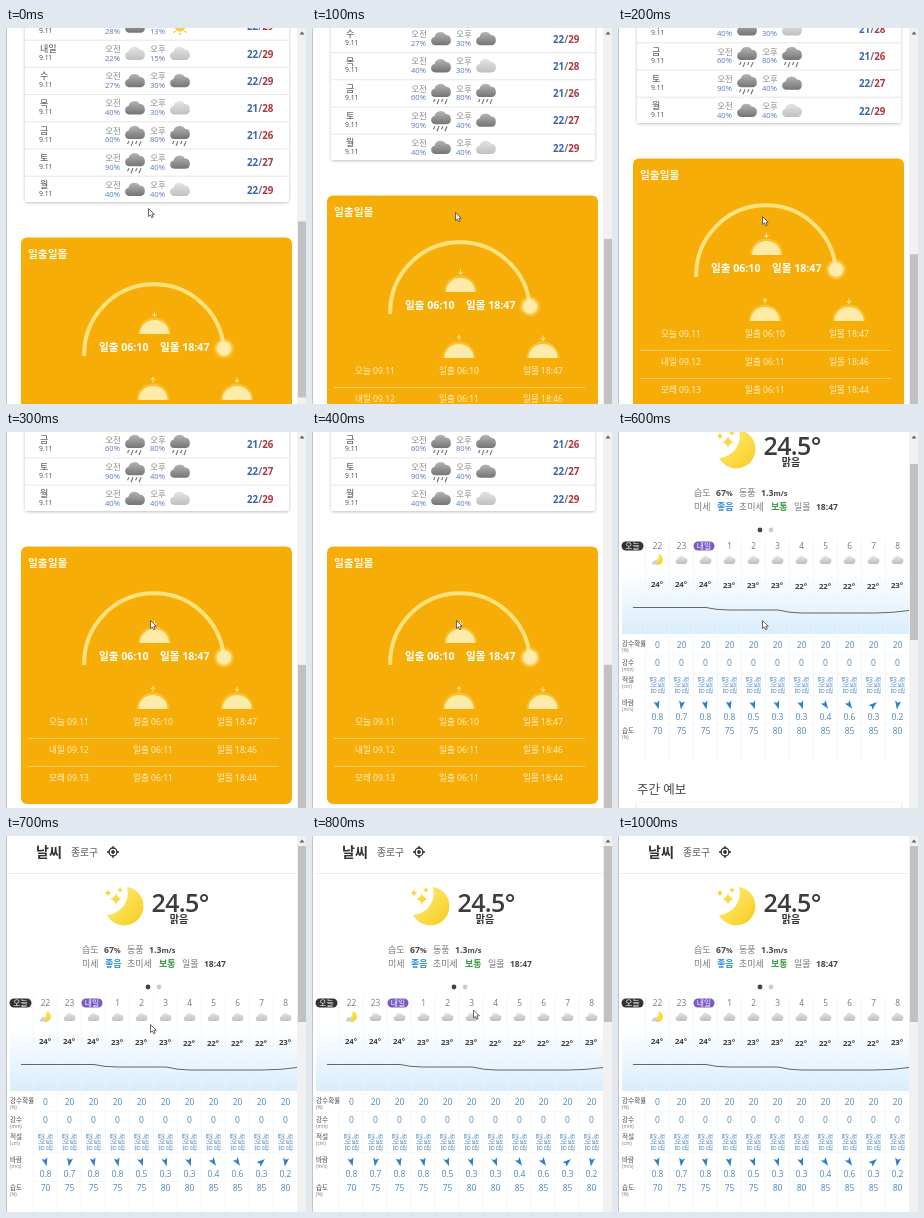
An HTML page that plays this animation: 300x376 px, repeating every 1200 ms.

```html
<!DOCTYPE html>
<html lang="ko">
<head>
<meta charset="utf-8">
<style>
html, body { margin: 0; width: 100%; height: 100%; overflow: hidden; background: #fff; }
svg { display: block; width: 300px; height: 376px; }
text { font-family: "Open Sans", "Noto Sans CJK KR", "Noto Sans CJK", sans-serif; }
</style>
</head>
<body>
<svg id="stage" viewBox="0 0 300 376">
  <defs>
    <linearGradient id="dark" x2="0" y2="1"><stop stop-color="#b4b4b4"/><stop offset="1" stop-color="#747474"/></linearGradient>
    <linearGradient id="light" x2="0" y2="1"><stop stop-color="#e4e4e4"/><stop offset="1" stop-color="#c0c0c0"/></linearGradient>
    <linearGradient id="sky" x2="0" y2="1"><stop stop-color="#fff"/><stop offset="1" stop-color="#d9edfc"/></linearGradient>
    <linearGradient id="gold" x2="1" y2="1"><stop stop-color="#fff07c"/><stop offset="1" stop-color="#f7cb1e"/></linearGradient>
    <radialGradient id="glow"><stop offset=".45" stop-color="#fff0a8"/><stop offset="1" stop-color="#ffdf70" stop-opacity="0"/></radialGradient>
    <filter id="shadow" x="-10%" y="-10%" width="120%" height="120%"><feDropShadow dx="0" dy="1" stdDeviation="1.5" flood-opacity=".25"/></filter>
    <filter id="soft" x="-20%" y="-20%" width="140%" height="140%"><feGaussianBlur stdDeviation=".5"/></filter>
    <path id="cloud" d="M-6 6.5A4.2 4.2 0 0 1-6.5-1.8A6.3 6.3 0 0 1 5-3.8A4.8 5.2 0 0 1 6 6.5Z"/>
    <path id="moon" d="M121 51A19.3 19.3 0 1 1 101 79A22 22 0 0 0 121 51Z" fill="url(#gold)"/>
    <path id="star" d="M0-5Q.8-.8 5 0Q.8.8 0 5Q-.8.8-5 0Q-.8-.8 0-5Z" fill="#f9d83a"/>
  </defs>
  <g id="page"></g>
  <rect width="1" height="376" fill="#c4c4c4"/>
  <rect x="291" width="9" height="376" fill="#f1f1f1"/>
  <path d="M293.5 6.5L296 3.5L298.5 6.5Z" fill="#606060"/>
  <rect id="thumb" x="292" width="8" height="176" fill="#c1c1c1"/>
  <path id="cursor" d="M0 0V8L1.9 6.4L3.2 9.2L4.6 8.6L3.4 5.8H5.8Z" fill="#fff" stroke="#444" stroke-width=".8"/>
</svg>
<script>
const $ = id => document.getElementById(id);
const INK = '#484848', GRAY = '#777', BLUE = '#4d86bf';

// Text placed by its vertical middle.
const text = (x, y, str, size, fill = INK, weight = 400, anchor = 'start', extra = '') =>
  `<text x="${x}" y="${y + size * 0.36}" font-size="${size}" fill="${fill}" font-weight="${weight}" text-anchor="${anchor}" ${extra}>${str}</text>`;
const mid = (x, y, str, size, fill, weight, extra) => text(x, y, str, size, fill, weight, 'middle', extra);
const small = unit => `<tspan font-size="7.4">${unit}</tspan>`;
const line = (x1, y1, x2, y2, stroke, width = 1) =>
  `<path d="M${x1} ${y1}L${x2} ${y2}" stroke="${stroke}" stroke-width="${width}" fill="none"/>`;
const use = (id, x, y, scale = 1, fill = '') =>
  `<use href="#${id}" transform="translate(${x} ${y}) scale(${scale})" fill="${fill}"/>`;

function header() {
  return text(30, 16, '날씨', 14, '#333', 700) + text(65, 16, '종로구', 9.8, '#555') +
    `<g stroke="#333" fill="none" stroke-width="1.3"><circle cx="107" cy="16" r="4"/><path d="M107 10v3m0 6v3M101 16h3m6 0h3"/></g><circle cx="107" cy="16" r="1.9" fill="#333"/>` +
    line(2, 37.5, 291, 37.5, '#eee') +
    '<use href="#moon"/>' + use('star', 110, 63, 1.2) + use('star', 102, 57, .7) + use('star', 114, 54, .6) +
    text(145.5, 67, '24.5°', 25, '#3c3c3c', 600, 'start', 'letter-spacing="-.6"') +
    mid(173, 83, '맑음', 10, '#333', 700) +
    text(76, 114, '습도', 9, GRAY) + text(98, 114, '67' + small('%'), 8.7, INK, 700) +
    text(121, 114, '동풍', 9, GRAY) + text(143, 114, '1.3' + small('m/s'), 8.7, INK, 700) +
    text(76, 128, '미세', 9, GRAY) + text(99, 128, '좋음', 9, '#2f8fdc', 700) +
    text(121, 128, '초미세', 9, GRAY) + text(153, 128, '보통', 9, '#3a9a3f', 700) +
    text(176, 128, '일몰', 9, GRAY) + text(198, 128, '18:47', 8.5, INK, 700) +
    '<circle cx="142" cy="151" r="2.4" fill="#444"/><circle cx="153" cy="151" r="2.4" fill="#ccc"/>';
}

const pill = (x, y, width, label, fill) =>
  `<rect x="${x - width / 2}" y="${y - 4.5}" width="${width}" height="9" rx="4.5" fill="${fill}"/>` + mid(x, y, label, 7.8, '#fff');

function hourly() {
  const hours = [22, 23, '내일', 1, 2, 3, 4, 5, 6, 7, 8];
  const temps = [24, 24, 24, 23, 23, 23, 22, 22, 22, 22, 23];
  const winds = [.8, .7, .8, .8, .5, .3, .3, .4, .6, .3, .2];
  const angles = [-15, 8, -12, -12, -20, -18, -20, -35, -35, -130, 8];
  const humidity = [70, 75, 75, 75, 75, 80, 80, 85, 85, 85, 80];
  const labels = [['강수확률', '(%)', 265], ['강수', '(mm)', 284], ['적설', '(cm)', 301], ['바람', '(m/s)', 324], ['습도', '(%)', 352]];

  let out = '<rect x="4" y="192" width="287" height="63" fill="url(#sky)"/>' + pill(14.5, 167, 22, '오늘', '#333');
  for (const [name, unit, y] of labels) out += text(4, y, name, 6.6, INK) + text(4, y + 6.5, unit, 4.8, GRAY);
  for (const y of [257.5, 275.5, 294.5, 316.5, 345.5]) out += line(28, y, 291, y, '#f5f6f8', .7);

  hours.forEach((hour, i) => {
    const x = 39.5 + 24 * i;
    out += line(x - 12, 160, x - 12, 381, '#f1f3f6', .7);
    out += i === 2 ? pill(x - 1.5, 167, 21, hour, '#7a5bc4') : mid(x, 167, hour, 8.3, GRAY);
    out += i ? use('cloud', x, 181, .6, 'url(#light)')
      : `<use href="#moon" transform="translate(${x} 180.5) scale(.28) translate(-118 -70)"/>` + use('cloud', x - 2.5, 183.5, .32, '#d0d0d0');
    out += mid(x - .5, 205 + (24 - temps[i]) * 1.1, temps[i] + '°', 7.8, '#3a3a3a', 700);
    out += mid(x, 266, i ? 20 : 0, 8.5, BLUE) + mid(x, 284, 0, 8.5, BLUE);
    out += `<g transform="translate(${x - .5} 306) rotate(90)">${mid(0, -4, '적설량', 6.4, BLUE)}${mid(0, 4, '없어요', 6.4, BLUE)}</g>`;
    out += `<path d="M0 4.5L-3-4L0-2.2L3-4Z" fill="#2c82d2" transform="translate(${x} 326) rotate(${angles[i]})"/>`;
    out += mid(x, 338, winds[i].toFixed(1), 8.5, BLUE) + mid(x, 352, humidity[i], 8.5, BLUE);
  });
  return out + '<path d="M15 228.5H88Q98 231 112 231H160Q172 234 184 234H256Q274 234 291 231.5" fill="none" stroke="#666"/>';
}

function skyIcon(kind, x, y) {
  if (kind === 'sun') {
    let rays = '';
    for (let a = 0; a < 360; a += 45) rays += `<path d="M0-6.5V-9" transform="rotate(${a})"/>`;
    return `<g transform="translate(${x} ${y})" stroke="#f8c832" stroke-width="1.5"><circle r="4.5" fill="#ffd23c"/>${rays}</g>`;
  }
  if (kind !== 'rain') return use('cloud', x, y, 1, `url(#${kind})`);
  return use('cloud', x, y - 2.5, 1, 'url(#dark)') +
    `<path d="M${x - 6} ${y + 6}l-1.5 3m5.5-3l-2 5m6-5l-1.5 3m5.5-3l-2 5" stroke="#777" stroke-width="1.2" fill="none"/>`;
}

function weekly() {
  const days = [
    ['오늘', 28, 'dark', 13, 'sun', 22, 29],
    ['내일', 22, 'light', 15, 'light', 22, 29],
    ['수', 27, 'dark', 30, 'dark', 22, 29],
    ['목', 40, 'dark', 30, 'light', 21, 28],
    ['금', 60, 'rain', 80, 'rain', 21, 26],
    ['토', 90, 'rain', 40, 'dark', 22, 27],
    ['월', 40, 'dark', 40, 'light', 22, 29]
  ];
  let out = text(19, 410, '주간 예보', 12.5, INK) +
    '<rect x="19" y="424" width="264" height="192" rx="3" fill="#fff" filter="url(#shadow)"/>';
  days.forEach(([day, am, amSky, pm, pmSky, low, high], i) => {
    const y = 435.8 + 27.2 * i;
    if (i) out += line(19, y - 8.8, 283, y - 8.8, '#e4e4e4', .9);
    out += text(34, y, day, 9, INK) + text(33, y + 8.5, '9.11', 6.8, INK);
    for (const [x, label, chance, sky] of [[107, '오전', am, amSky], [152, '오후', pm, pmSky]])
      out += mid(x, y, label, 8.5, '#8a8a8a') + mid(x - .5, y + 9, chance + '%', 7.6, '#5577bd') + skyIcon(sky, x + 22, y + 4.5);
    out += text(241, y + 5, `<tspan fill="#3866b4">${low}</tspan><tspan fill="#777">/</tspan><tspan fill="#ae373d">${high}</tspan>`, 9.8, INK, 700);
  });
  return out;
}

function halfSun(x, y, up) {
  const head = up ? 'M-2-20L0-22.5L2-20' : 'M-2-20L0-17.5L2-20';
  return `<g transform="translate(${x} ${y})"><path d="M-16.5 0A16.5 16.5 0 0 1 16.5 0Z" fill="#ffdd70" opacity=".4" filter="url(#soft)"/>
    <path d="M-14.5 0A14.5 14 0 0 1 14.5 0Z" fill="#ffeba8" filter="url(#soft)"/>
    <path d="M0-17.5V-22.5${head}" stroke="#ffe9a0" fill="none"/></g>`;
}

function sunCard() {
  const cream = '#fff3d0';
  const rows = [['오늘 09.11', '06:10', '18:47'], ['내일 09.12', '06:11', '18:46'], ['모레 09.13', '06:11', '18:44']];
  let out = '<rect x="15" y="-.5" width="271" height="257.5" rx="6" fill="#f7ad08"/>' +
    text(22, 16, '일출일몰', 10.7, '#fff8e4', 700) +
    '<path d="M78.2 118V117A69.95 69.95 0 0 1 217.9 111" fill="none" stroke="#ffe27c" stroke-width="4"/>' +
    '<circle cx="218" cy="110.5" r="11" fill="url(#glow)"/><circle cx="218" cy="110.5" r="7" fill="#ffebab" filter="url(#soft)"/>' +
    halfSun(148.5, 96, false) + halfSun(147, 162, true) + halfSun(231, 162, false) +
    text(93, 109.4, '일출 06:10', 10.6, '#fff', 700) + text(154, 109.4, '일몰 18:47', 10.6, '#fff', 700);
  rows.forEach(([day, rise, set], i) => {
    const y = 175 + 28 * i;
    out += mid(63, y, day, 8.6, cream) + mid(147, y, '일출 ' + rise, 8.6, cream) + mid(231, y, '일몰 ' + set, 8.6, cream);
    if (i < 2) out += line(22, y + 16.5, 273, y + 16.5, '#ffd27a', .8);
  });
  return `<g transform="translate(0 652)">${out}</g>`;
}

$('page').innerHTML = header() + hourly() + weekly() + sunCard();

// One entry per 100 ms: scroll offset, then pointer position if it is visible.
const STEP = 100, LOOP = 1200;
const steps = [
  [442, 142.5, 180.5], [484, 143.5, 184.5], [521, 144.5, 188.5], [537, 144.5, 188.5],
  [537, 144.5, 188.5], [526, 144.5, 188.5], [53, 144.5, 188.5], [0, 144.5, 188.5],
  [0, 161.5, 174], [0, 215, 125], [0], [0]
];

function draw(time) {
  const [scroll, x, y] = steps[Math.floor(time % LOOP / STEP)];
  $('page').setAttribute('transform', `translate(0 ${-scroll})`);
  $('thumb').setAttribute('y', 10 + scroll * 0.415);
  $('cursor').setAttribute('visibility', x ? 'visible' : 'hidden');
  if (x) $('cursor').setAttribute('transform', `translate(${x} ${y})`);
}

const start = performance.now();
function tick() {
  draw(performance.now() - start);
  requestAnimationFrame(tick);
}
tick();
</script>
</body>
</html>
```
